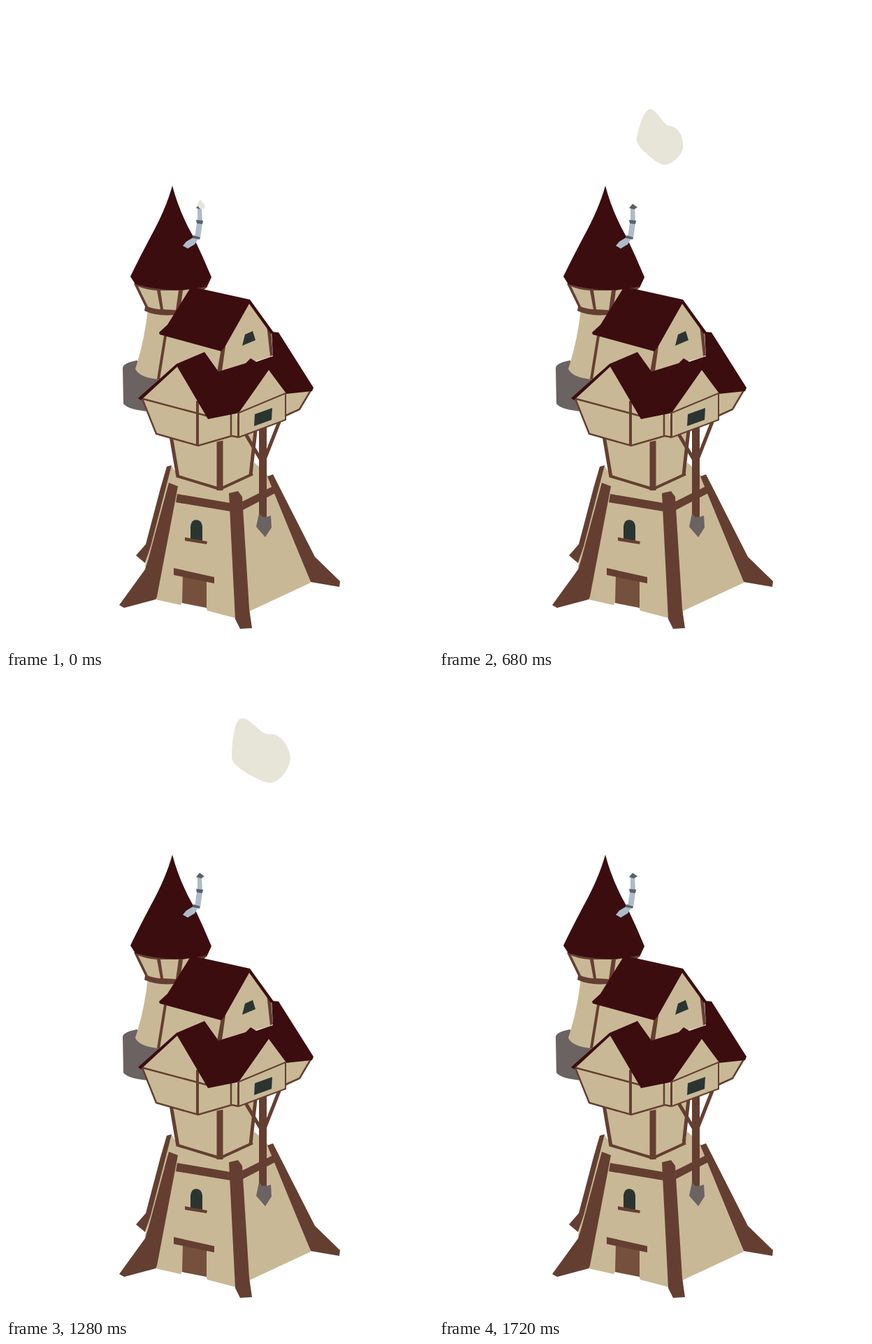
An HTML page that plays this animation: 611x917 px, repeating every 2.56 s.

```html
<!DOCTYPE html>
<html lang="en">
<head>
<meta charset="utf-8">
<title>Tower</title>
<style>
html, body { margin: 0; width: 100%; height: 100%; overflow: hidden; background: #fff; }
svg { display: block; width: 100%; height: 100%; }
.wall { fill: #c9b896; }
.wood { fill: #643f31; }
.roof { fill: #3b0d0f; }
.stone { fill: #6a6362; }
.dark { fill: #2a3532; }
.door { fill: #75503c; }
.pipe { fill: #adbbcb; }
.joint { fill: #5b6068; }
.beam { fill: none; stroke: #643f31; }
.smoke { fill: #e7e5d8; }
</style>
</head>
<body>
<svg viewBox="0 0 611 917">
  <!-- base -->
  <path class="wall" d="M236 657L246 671L306 691L352 669L355 653L363 660L379 676L436 825L348 866L330 876L288 865L286 860L252 853L250 857L214 849L199 801L214 740Z"/>
  <path class="wood" d="M230 659L237 657L229 688L207 773L199 797L186 786L200 770L221 690Z"/>
  <path class="wood" d="M374 673L382 670L442 788L478 823L477 831L436 824Z"/>
  <path class="wood" d="M245 698L321 711V723L243 710ZM338 709L382 687L385 697L339 721Z"/>
  <path class="wood" d="M233 682L246 687L216 845L214 849L169 861L162 857L199 806L204 790Z"/>
  <path class="wood" d="M319 697L332 694L338 702L348 862L352 890L335 891L328 877Z"/>
  <path class="dark" d="M264 763V745Q265 735 272 735Q280 735 281 745V765Z"/>
  <path class="wood" d="M256 760L288 766L287 770L256 765Z"/>
  <path class="door" d="M253 814L287 820V861L252 854Z"/>
  <path class="wood" d="M240 804L298 817V826L240 814Z"/>

  <!-- middle storey -->
  <path class="wall" d="M236 615L246 673L306 691L352 670L359 606Z"/>
  <path class="beam" stroke-width="4" d="M245 672.5L306 691L353 669.5"/>
  <path class="beam" stroke-width="5" d="M236 615L246 674M357 608L350 671"/>
  <path class="beam" stroke-width="9" d="M306 615V693"/>
  <path class="beam" stroke-width="11" d="M367.5 598V732"/>
  <path class="beam" stroke-width="5" d="M342 611L367 653M391 595L369 651"/>
  <path class="stone" d="M362 726L367 731H373L379 729L380 746L371 760L358 745Z"/>

  <!-- turret -->
  <path class="stone" d="M187 507Q167 511 167 518L168 569Q175 578 206 580L222 560V530Z"/>
  <path class="wall" d="M203 434Q198 480 185 519Q190 531 217 534L245 470V436Z"/>
  <path class="wood" d="M183 397L199 430L198 436Q215 444 240 442L288 402V396Z"/>
  <path class="wall" d="M189 401Q200 406 216 407L221 434Q210 433 203 430ZM221 407H247L243 435L225 434ZM253 407L276 403L250 430Z"/>
  <path class="roof" d="M238 257Q248 295 268 330Q282 359 294 388L288 401Q240 413 185 398L178 387Q190 362 207 330Q229 290 238 257Z"/>

  <!-- chimney -->
  <path class="pipe" d="M253 343L258 337L268 331L275 333L270 341L260 347ZM270 331L273 311H281L278 332ZM274 289H280L281 308H274Z"/>
  <path class="joint" d="M272 306L282 307L281 312L273 311ZM268 328L278 331L277 334L267 332ZM277 283L284 288L279 291L272 289Z"/>

  <!-- upper house -->
  <path class="wall" d="M229 470L310 490L306 530L218 535Z"/>
  <path class="beam" stroke-width="4" d="M228 472L218 534"/>
  <path class="wall" d="M348 424L379 466V502L350 510L303 526L310 490Z"/>
  <path class="wood" d="M308 490L314 487L309 522L302 524ZM373 456L379 463L382 500L378 501Z"/>
  <path class="roof" d="M264 403L272 403L349 420L383 467L379 469L348 426L313 488L308 494L220 470L219 467L231 456Z"/>
  <path class="dark" d="M342 470L353 465L357 478L338 486Z"/>

  <!-- lower house -->
  <path class="wall" d="M246 515L290 588L330 580L333 617L275 629L215 612L194 562ZM398 553L436 550L420 577L400 588Z"/>
  <path class="beam" stroke-width="2.5" d="M195 562L215 612L275 629L323 615L333 617M196 562L275 583L290 587M322 580V614M436 550L420 577L400 586"/>
  <path class="beam" stroke-width="4" d="M274 565V629"/>
  <path class="roof" d="M244 512L284 495L304 523L343 511L350 504L358 509L382 501L380 466L390 467L440 546L438 551L400 555L376 521L334 582L289 591L245 516L193 564L189 561Z"/>
  <path class="wall" d="M376 521L400 553V592L333 617V582Z"/>
  <path class="beam" stroke-width="2" d="M333 582L400 554V592L333 617"/>
  <path class="beam" stroke-width="3" d="M332.5 581V617"/>
  <path class="dark" d="M356 584L381 575L380 592L355 601Z"/>

  <path id="smoke" class="smoke" d="M-30-47C-18-47-4-27 8-25C22-28 30-20 36-12C42-3 46 8 43 17C40 30 28 47 14 47C2 46-12 38-24 32C-36 25-43 18-43 12C-44-6-44-47-30-47Z"/>
</svg>
<script>
const LOOP = 2560, STEP = 40, RISE = 1680;
const smoke = document.getElementById('smoke');

const bezier = (a, b, c, p) => (1 - p) ** 2 * a + 2 * p * (1 - p) * b + p * p * c;

// the puff drifts along a curve, swells quickly at first and turns slowly
function draw(ms) {
  const p = Math.floor(ms % LOOP / STEP) * STEP / RISE;
  smoke.style.display = p > 1 ? 'none' : '';
  const x = bezier(279.5, 316, 404, p);
  const y = bezier(284.5, 163, 57, p);
  const size = 0.127 + 0.93 * p ** 0.4;
  const turn = 26 - 30 * p;
  smoke.setAttribute('transform', `translate(${x} ${y}) rotate(${turn}) scale(${size})`);
}

let start;
function tick(now) {
  start ??= now;
  draw(now - start);
  requestAnimationFrame(tick);
}
draw(0);
requestAnimationFrame(tick);
</script>
</body>
</html>
```
